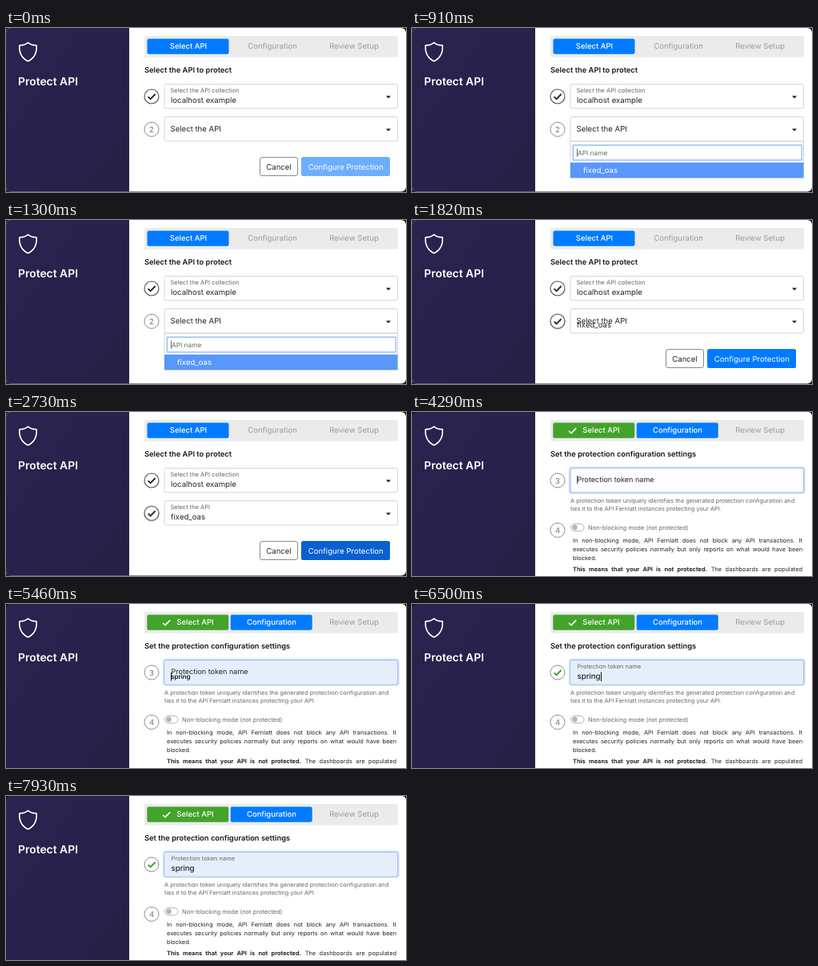
An HTML page for the animation above (8000 ms loop, 500 by 206 pixels).

```html
<!DOCTYPE html>
<html lang="en">
<head>
<meta charset="utf-8">
<title>Protect API</title>
<style>
  html, body { margin: 0; width: 100%; height: 100%; overflow: hidden; background: #1f1f22; }
  svg { display: block; width: 500px; height: 206px; }
  text, .body { font-family: Inter, "Liberation Sans", sans-serif; text-rendering: geometricPrecision; }
  text { font-size: 9.6px; fill: #212529; white-space: pre; }
  .title { font-size: 13.9px; font-weight: 600; fill: #fff; }
  .head { font-size: 9.35px; font-weight: 600; fill: #16181b; }
  .tab { font-weight: 500; font-size: 9.5px; text-anchor: middle; fill: #fff; }
  .off { fill: #9b9b9b; font-weight: 400; font-size: 9.6px; }
  .label { font-size: 7.5px; fill: #63686d; }
  .help { font-size: 7.35px; }
  .num { text-anchor: middle; fill: #777; }
  .btn { text-anchor: middle; }
  .field { fill: #fff; stroke: #d6d6d6; }
  .ring { fill: #fff; stroke: #8c8c8c; }
  .tick { fill: none; stroke-width: 1.8; }
  .caret { stroke: #111; stroke-width: 1; }
  .body { position: relative; font-size: 7.4px; color: #212529; }
  .body div { position: absolute; left: 0; right: 0; line-height: 10px; white-space: nowrap; }
  .body .full { text-align: justify; text-align-last: justify; }
</style>
</head>
<body>
<svg viewBox="0 0 500 206" xmlns="http://www.w3.org/2000/svg">
  <defs>
    <linearGradient id="night" x1="0" y1="0" x2="1" y2="1">
      <stop offset="0" stop-color="#2b2350"/>
      <stop offset="1" stop-color="#261f45"/>
    </linearGradient>
    <clipPath id="short"><rect width="500" height="205.4" rx="6"/></clipPath>
    <clipPath id="tall"><rect width="500" height="230" rx="6"/></clipPath>
    <g id="side">
      <rect width="500" height="230" fill="#fff"/>
      <rect width="154" height="230" fill="url(#night)"/>
      <path d="M27.500 18.300C24.500 20.800 20.500 21.800 16.800 21.800C16.300 31 19.500 38 27.500 41.700C35.500 38 38.700 31 38.200 21.800C34.500 21.800 30.500 20.800 27.500 18.300Z"
        fill="none" stroke="#fff" stroke-width="1.6" stroke-linejoin="round"/>
      <text class="title" x="15" y="71.800">Protect API</text>
      <rect x="173" y="10" width="317" height="26.500" rx="1.500" fill="#ebebeb"/>
      <text class="tab off" x="435" y="26.400">Review Setup</text>
    </g>
    <rect id="tab" y="13.500" width="102" height="19.300" rx="2"/>
    <rect id="field" class="field" x="198" width="291.500" height="30.500" rx="2"/>
    <path id="arrow" d="M-3 -1.500H3L0 1.800Z" fill="#222"/>
    <path id="check" class="tick" d="M-4.400 .4L-1.400 3.200L4.600 -3"/>
    <g id="done">
      <circle r="9" fill="#fff" stroke="#47504c" stroke-width="1.1"/>
      <use href="#check" stroke="#1d2422"/>
    </g>
  </defs>

  <g id="pick" clip-path="url(#short)">
    <use href="#side"/>
    <use href="#tab" x="176.500" fill="#007bff"/>
    <text class="tab" x="228" y="26.400">Select API</text>
    <text class="tab off" x="333" y="26.400">Configuration</text>
    <text class="head" x="173" y="55.800">Select the API to protect</text>

    <use href="#done" x="182" y="86"/>
    <use href="#field" y="70.500"/>
    <text class="label" x="205.500" y="80.500">Select the API collection</text>
    <text x="206" y="94.300">localhost example</text>
    <use href="#arrow" x="478" y="86.800"/>

    <circle class="ring" cx="182" cy="127.300" r="9"/>
    <text class="num" x="182" y="130.800">2</text>
    <use id="done2" href="#done" x="182" y="127.300"/>
    <use href="#field" y="111.500"/>
    <text id="apiLabel" x="205.500" y="129.500">Select the API</text>
    <text id="apiSmall" class="label" x="205.500" y="121.500">Select the API</text>
    <text id="apiValue" x="206" y="135.300">fixed_oas</text>
    <use href="#arrow" x="478" y="128"/>

    <rect x="317.500" y="162.500" width="47" height="23" rx="2.500" fill="#fff" stroke="#868c92"/>
    <text class="btn" x="341" y="177.500" fill="#444">Cancel</text>
    <rect id="go" x="369" y="162" width="111" height="24" rx="2.500" fill="#6eaeff"/>
    <text class="btn" x="424.800" y="177.500" style="fill:#fff">Configure Protection</text>

    <g id="menu">
      <rect x="198" y="142.500" width="291.500" height="45.500" fill="#fff" stroke="#d6d6d6"/>
      <rect x="201.200" y="147" width="286" height="19" rx="1.500" fill="#fff" stroke="#cfe2fb" stroke-width="2.500"/>
      <rect x="201.500" y="147.300" width="285.500" height="18.500" fill="#fff" stroke="#8fbaf3"/>
      <path class="caret" d="M206.500 151.500V161.500" style="stroke:#666"/>
      <text class="label" x="207" y="159.700" style="font-size:8.3px">API name</text>
      <rect x="198" y="169" width="291.500" height="19.300" fill="#5897fb"/>
      <text x="214" y="182" style="fill:#fff">fixed_oas</text>
    </g>
  </g>

  <g id="setup" clip-path="url(#tall)">
    <use href="#side"/>
    <use href="#tab" x="176.300" fill="#43a32a"/>
    <use href="#check" transform="translate(200.500 23.400)" stroke="#fff" style="stroke-width:1.4"/>
    <text class="tab" x="236.500" y="26.400">Select API</text>
    <use href="#tab" x="280.700" fill="#007bff"/>
    <text class="tab" x="332" y="26.400">Configuration</text>
    <text class="head" x="173" y="55.800">Set the protection configuration settings</text>

    <circle class="ring" cx="182" cy="86" r="9"/>
    <text id="three" class="num" x="182" y="89.500">3</text>
    <use id="done3" href="#check" x="182" y="86" stroke="#35a32e"/>

    <use href="#field" y="70.500"/>
    <g id="focus">
      <rect x="197.300" y="70" width="293" height="31.500" rx="3" fill="none" stroke="#d0e2fb" stroke-width="3"/>
      <rect x="198" y="70.500" width="291.500" height="30.500" rx="2" fill="#fdfdff" stroke="#9dc0f3" stroke-width="1.200"/>
    </g>
    <rect id="tint" x="198.500" y="71" width="290.500" height="29.500" rx="1.500" fill="#e5effc"/>
    <text id="tokenLabel" x="206.500" y="88" style="font-size:9.05px">Protection token name</text>
    <text id="tokenSmall" class="label" x="206.500" y="80.900">Protection token name</text>
    <text id="preview" x="206.300" y="94" style="font-size:8px;font-weight:500;fill:#000">spring</text>
    <text id="token" x="206.500" y="94.200" style="font-size:9.8px;fill:#000">spring</text>
    <path id="startCaret" class="caret" d="M206.500 80V90.500" style="stroke:#666"/>
    <path id="fillCaret" class="caret" d="M206.500 86V96.500"/>
    <path id="endCaret" class="caret" d="M236.500 85.500V97"/>

    <text class="label help" x="198" y="114.300">A protection token uniquely identifies the generated protection configuration and</text>
    <text class="label help" x="198" y="124.400">ties it to the API Fernlatt instances protecting your API.</text>

    <circle class="ring" cx="182" cy="148.400" r="9"/>
    <text class="num" x="182" y="151.900">4</text>
    <rect x="198.500" y="140.500" width="16.500" height="9" rx="4.500" fill="#fff" stroke="#adb5bd"/>
    <circle cx="203.500" cy="145" r="3.200" fill="#adb5bd"/>
    <text class="label" x="220" y="148">Non-blocking mode (not protected)</text>

    <foreignObject x="201" y="156" width="287" height="50">
      <div class="body" xmlns="http://www.w3.org/1999/xhtml">
        <div class="full" style="top:1px">In non-blocking mode, API Fernlatt does not block any API transactions. It</div>
        <div class="full" style="top:12px">executes security policies normally but only reports on what would have been</div>
        <div style="top:23px">blocked.</div>
        <div class="full" style="top:37px"><b>This means that your API is not protected.</b> The dashboards are populated</div>
      </div>
    </foreignObject>
  </g>
</svg>
<script>
  const LOOP = 8000;

  // Plays held values: rows are [start ms, value].
  function hold(id, prop, rows) {
    const frames = rows.map(([ms, value]) => ({ offset: ms / LOOP, [prop]: value, easing: "step-end" }));
    frames.push({ offset: 1, [prop]: rows[rows.length - 1][1] });
    document.getElementById(id).animate(frames, { duration: LOOP, iterations: Infinity });
  }

  // Times alternate between on and off.
  const shown = {
    menu: [910, 1690],
    done2: [1690],
    apiLabel: [0, 1950],
    apiSmall: [1950],
    apiValue: [1690],
    setup: [2860],
    focus: [4290],
    startCaret: [4290, 4810],
    tint: [5330],
    fillCaret: [5330, 5590],
    preview: [5460, 5590],
    tokenLabel: [0, 5590],
    tokenSmall: [5590],
    token: [5590],
    three: [0, 5590],
    done3: [5590],
    endCaret: [5590, 6110, 6500, 7020, 7540, 7930]
  };

  for (const [id, times] of Object.entries(shown)) {
    const rows = times.map((ms, i) => [ms, i % 2 ? 0 : 1]);
    if (times[0] > 0) rows.unshift([0, 0]);
    hold(id, "opacity", rows);
  }

  hold("go", "fill", [[0, "#6eaeff"], [1690, "#007bff"], [2340, "#046de4"], [2470, "#0a60d0"]]);
</script>
</body>
</html>
```
